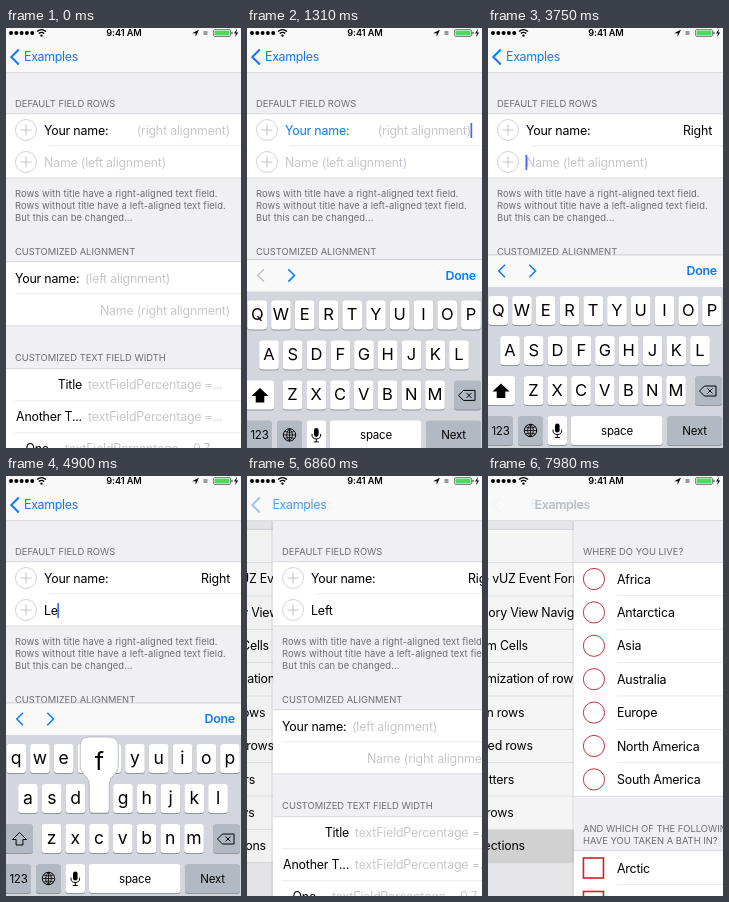
Write an HTML page that moves like this. It is 235x420 px and loops after 8 s.

```html
<!DOCTYPE html>
<html lang="en">
<head>
<meta charset="utf-8">
<title>Form rows</title>
<style>
  html, body { margin: 0; width: 100%; height: 100%; overflow: hidden; background: #efeff4; }
  svg { display: block; width: 100%; height: 100%; }
  text { font: 12.4px Inter, sans-serif; letter-spacing: -.2px; white-space: pre; }
  .head { font-size: 9.4px; letter-spacing: 0; fill: #6d6d72; }
  .note { font-size: 9.4px; letter-spacing: .08px; fill: #6d6d72; }
  .hint { fill: #c7c7cd; }
  .blue { fill: #0b7cf5; }
  .bold { font-weight: 600; }
  .end { text-anchor: end; }
  .mid { text-anchor: middle; }
  .upper { font-size: 16.5px; letter-spacing: 0; }
  .lower { font-size: 17.5px; letter-spacing: 0; }
  .small { font-size: 11.5px; }
  .line { fill: none; stroke: #000; }
  #backLabel, #title { letter-spacing: -.3px; }
</style>
</head>
<body>
<svg id="stage" viewBox="0 0 235 420"></svg>
<script>
const W = 235, LOOP = 8000, KEYBOARD = 193;
const EDGE = '#d0cfd4', SEPARATOR = '#dfdee3';

const text = (x, y, s, cls = '', id = '') => `<text x="${x}" y="${y}" class="${cls}" id="${id}">${s}</text>`;
const rect = (x, y, w, h, fill, more = '') => `<rect x="${x}" y="${y}" width="${w}" height="${h}" fill="${fill}" ${more}/>`;
const path = (d, more = '') => `<path d="${d}" class="line" ${more}/>`;
const circle = (x, y, r, more = '') => `<circle cx="${x}" cy="${y}" r="${r}" ${more}/>`;
const group = (id, ...parts) => `<g id="${id}">${parts.join('')}</g>`;

// White table section with hairlines between its rows
function section(y, pitch, rows, inset) {
  const h = pitch * rows;
  let s = rect(0, y, W, h, '#fff') + rect(0, y - .5, W, .7, EDGE) + rect(0, y + h - .5, W, .7, EDGE);
  for (let i = 1; i < rows; i++) s += rect(inset, y + i * pitch - .5, W, .7, SEPARATOR);
  return s;
}
const sheet = () => rect(-2, 45, 2, 375, '#000', 'opacity=".06"') + rect(0, 45, W, 375, '#efeff4');

function listPage() {
  const names = ['Rows', 'Native vUZ Event Form', 'Accesory View Navigation', 'Custom Cells',
    'Customization of rows with text…', 'Hidden rows', 'Disabled rows', 'Formatters', 'Inline rows', 'List Sections'];
  const top = 53.4, pitch = 33.35;
  return group('list', sheet(), section(top, pitch, names.length, 9),
    rect(0, 354, W, 33, '#d9d9d9', 'id="selected"'),
    ...names.map((name, i) => {
      const y = top + (i + .5) * pitch;
      return text(9.5, y + 4, name) + path(`M217,${y - 4.5}l4.5,4.5l-4.5,4.5`, 'stroke="#c7c7cc" style="stroke:#c7c7cc;stroke-width:1.5"');
    }));
}

function detailPage() {
  const plus = y => circle(20, y, 10.5, 'fill="none" stroke="#cfcfd3" stroke-width=".9"') +
    path(`M14.5,${y}h11M20,${y - 5.5}v11`, 'style="stroke:#c2c2c7"');
  const notes = ['Rows with title have a right-aligned text field.',
    'Rows without title have a left-aligned text field.', 'But this can be changed...'];
  return group('detail', sheet(),
    text(9, 79, 'DEFAULT FIELD ROWS', 'head'),
    section(86, 32, 2, 43), plus(102), plus(134),
    text(38, 106.5, 'Your name:', '', 'nameLabel'),
    text(224, 106.5, '', 'end', 'fieldA'), text(38, 138.5, '', '', 'fieldB'),
    rect(223, 95, 1.7, 15, '#426bf2', 'id="caret"'),
    ...notes.map((s, i) => text(9, 169 + i * 12, s, 'note')),
    text(9, 226.5, 'CUSTOMIZED ALIGNMENT', 'head'),
    section(234, 32, 2, 9),
    text(9, 254.5, 'Your name:'), text(79, 254.5, '(left alignment)', 'hint'),
    text(224, 286.5, 'Name (right alignment)', 'hint end'),
    text(9, 332.5, 'CUSTOMIZED TEXT FIELD WIDTH', 'head'),
    section(341, 32, 3, 9),
    text(76, 361, 'Title', 'end'), text(82, 361, 'textFieldPercentage =...', 'hint'),
    text(76, 393, 'Another T...', 'end'), text(82, 393, 'textFieldPercentage =...', 'hint'),
    text(53, 425, 'One...', 'end'), text(59, 425, 'textFieldPercentage = 0.7', 'hint'));
}

function choicePage() {
  const places = ['Africa', 'Antarctica', 'Asia', 'Australia', 'Europe', 'North America', 'South America'];
  const red = 'fill="none" stroke="#c8323e" stroke-width="1"';
  const box = y => rect(9.5, y, 20, 20, 'none', 'stroke="#d21f26" stroke-width="1.6"');
  return group('choice', sheet(),
    text(9, 79, 'WHERE DO YOU LIVE?', 'head'),
    section(86.5, 33.4, 7, 43),
    ...places.map((s, i) => {
      const y = 103 + i * 33.4;
      return circle(20, y, 10.6, red) + text(43, y + 4.5, s);
    }),
    text(9, 355.5, 'AND WHICH OF THE FOLLOWING OCEANS', 'head'),
    text(9, 368, 'HAVE YOU TAKEN A BATH IN?', 'head'),
    section(375, 33.4, 2, 43), box(382), box(415.5), text(43, 396.5, 'Arctic'));
}

function bars() {
  const dots = [0, 1, 2, 3, 4].map(i => circle(5 + i * 5.3, 5, 2)).join('');
  return rect(0, 0, W, 45, '#f9f9fa') + rect(0, 44.5, W, .6, '#c4c4c8') + dots +
    path('M31,3.6q4.5,-4 9,0M32.8,5.6q2.7,-2.4 5.4,0', 'stroke-width="1.3"') + circle(35.5, 7.6, 1.2) +
    text(118, 8.4, '9:41 AM', 'mid bold" style="font-size:9.2px;letter-spacing:-.1px') +
    '<path d="M186,5.2L193,1.8L189.6,8.8V5.2z"/>' + rect(197.5, 3, 4, 4, '#9a9a9e') +
    rect(207.5, 1.5, 17, 7, '#fff', 'rx="1.5" stroke="#555" stroke-width=".7"') +
    rect(208.5, 2.5, 15, 5, '#4cd964') + rect(225.3, 3.7, 1.2, 2.6, '#555') +
    '<path d="M231,1l-3,4.6h2l-1,3.6l3.2,-4.8h-2z"/>' +
    path('M12.8,21.5L5.3,29L12.8,36.5', 'id="back" style="stroke:#0b7cf5;stroke-width:2"') +
    text(18, 33.2, 'Examples', 'blue', 'backLabel') + text(22, 33.2, 'Examples', 'bold', 'title');
}

const ROWS = [['qwertyuiop', 10.2], ['asdfghjkl', 22], ['zxcvbnm', 45.5]];
const rowTop = r => 268 + r * 40;
function keyPosition(letter) {
  const r = ROWS.findIndex(([keys]) => keys.includes(letter.toLowerCase()));
  return [ROWS[r][1] + ROWS[r][0].indexOf(letter.toLowerCase()) * 23.75, rowTop(r)];
}

function keyboard() {
  const key = (x, y, w, fill = '#fff') => rect(x, y + 1, w, 29, '#8f9298', 'rx="3.2"') + rect(x, y, w, 29, fill, 'rx="3.2"');
  const gray = '#b3b9c3';
  const letters = [...ROWS.map(r => r[0]).join('')];
  const labels = (cls, change) => letters.map(c => {
    const [x, y] = keyPosition(c);
    return text(x, y + 20, change(c), 'mid ' + cls);
  });
  const chevron = (id, d) => path(d, `id="${id}" stroke-width="1.5"`);
  return group('keyboard', rect(0, 227, W, 32, '#f9f9fa'), rect(0, 226.6, W, .7, '#c0c0c4'),
    rect(0, 259, W, 161, '#d3d6dc'),
    chevron('prev', 'M17,236.8L10.8,243L17,249.2'), chevron('next', 'M41.3,236.8L47.5,243L41.3,249.2'),
    text(229, 247.3, 'Done', 'blue bold end', 'done'),
    ...letters.map(c => { const [x, y] = keyPosition(c); return key(x - 9.8, y, 19.6); }),
    group('upper', ...labels('upper', c => c.toUpperCase()), key(-2, 348, 29),
      '<path d="M13,355.5l8.5,8h-4.2v6.5h-8.6v-6.5h-4.2z"/>'),
    group('lower', ...labels('lower', c => c), key(-2, 348, 29, gray),
      path('M13.5,356.5l7,7h-3.6v5.5h-6.8v-5.5h-3.6z', 'stroke-width="1"')),
    key(207, 348, 27, gray),
    path('M211.5,363l5,-5h11.5v10h-11.5zM219.5,360.5l5,5m0,-5l-5,5', 'stroke-width="1"'),
    key(-2, 388, 27, gray), text(12.5, 407, '123', 'mid small'),
    key(30, 388, 25, gray), circle(42.5, 402.5, 6.2, 'class="line"'),
    path('M36.3,402.5h12.4M42.5,396.3v12.4M37.7,399q4.8,2 9.6,0M37.7,406q4.8,-2 9.6,0M42.5,396.3q-6,6.2 0,12.4q6,-6.2 0,-12.4', 'stroke-width=".8"'),
    key(59.5, 388, 19.5), rect(67, 395.5, 4.6, 9, '#000', 'rx="2.3"'),
    path('M65,401.5v1q0,4 4.3,4t4.3,-4v-1M69.3,406.5v3M66.8,409.5h5', 'stroke-width="1"'),
    key(83, 388, 91.5), text(129, 406.5, 'space', 'mid small'),
    key(179, 388, 55, gray), text(206.5, 406.5, 'Next', 'mid small'),
    '<g id="popup"><path fill="#fff" stroke="#a4a8af" stroke-width=".7" d="M-19,-38q0,-9 9,-9h20q9,0 9,9v20c0,9 -9,9 -9,19v24q0,4 -4,4h-12q-4,0 -4,-4v-24c0,-10 -9,-10 -9,-19z"/>' +
    text(0, -14, '', 'mid" style="font-size:25px', 'popupLetter') + '</g>');
}

const stage = document.getElementById('stage');
stage.innerHTML = listPage() + rect(0, 45, W, 375, '#000', 'id="dim"') + detailPage() + choicePage() + bars() + keyboard();
const el = {};
stage.querySelectorAll('[id]').forEach(n => { if (n.id) el[n.id] = n; });

// Each stroke: letter, key down, letter typed, key up
const STROKES_A = [['R', 1790, 1960, 1960], ['i', 2320, 2380, 2440], ['g', 2680, 2740, 2800],
  ['h', 2850, 2910, 2970], ['t', 3030, 3150, 3150]];
const STROKES_B = [['L', 4210, 4440, 4440], ['e', 4500, 4550, 4670], ['f', 4900, 4960, 5020], ['t', 5130, 5190, 5300]];

// Remaining distance of a critically damped spring
function spring(ms) {
  const a = Math.max(0, ms) * .01826;
  return (1 + a) * Math.exp(-a);
}
const move = (node, x, y = 0) => node.setAttribute('transform', `translate(${x} ${y})`);
const show = (node, on) => { node.style.display = on ? '' : 'none'; };

function setField(node, strokes, hint, t) {
  const typed = strokes.filter(s => t >= s[2]).map(s => s[0]).join('');
  node.textContent = typed || hint;
  node.classList.toggle('hint', !typed);
  return typed;
}

function render(t) {
  const focusA = t >= 1070 && t < 3750, focusB = t >= 3750 && t < 5750;
  setField(el.fieldA, STROKES_A, '(right alignment)', t);
  const typedB = setField(el.fieldB, STROKES_B, 'Name (left alignment)', t);
  el.nameLabel.classList.toggle('blue', focusA);
  show(el.caret, focusA || focusB);
  el.caret.setAttribute('x', focusA ? 223.5 : 37.5 + (typedB ? el.fieldB.getComputedTextLength() : 0));
  el.caret.setAttribute('y', focusA ? 95 : 127);

  const down = t < 1070 ? 1 : t < 5832 ? spring(t - 1000) : 1 - spring(t - 5832);
  move(el.keyboard, 0, KEYBOARD * down);
  show(el.keyboard, t >= 1070 && t < 6500);
  const upper = t < 1960 || (t >= 3750 && t < 4440);
  show(el.upper, upper);
  show(el.lower, !upper);
  el.prev.style.stroke = t < 3750 ? '#c3c5c9' : '#0b7cf5';
  el.next.style.stroke = '#0b7cf5';
  el.done.style.opacity = t < 5750 ? 1 : .25;

  const pressed = [...STROKES_A, ...STROKES_B].find(s => t >= s[1] && t < s[3]);
  show(el.popup, pressed);
  if (pressed) {
    move(el.popup, ...keyPosition(pressed[0]));
    el.popupLetter.textContent = pressed[0];
  }

  const popped = t < 6860 ? 0 : 1 - spring(t - 6830);
  const pushed = t < 7920 ? 0 : 1 - spring(t - 7863);
  const covered = t < 7600 ? 1 - popped : pushed;
  move(el.detail, W * popped);
  move(el.choice, W * (1 - pushed));
  show(el.detail, t < 7600);
  show(el.choice, t >= 7920);
  move(el.list, -.3 * W * covered);
  el.dim.style.opacity = .06 * covered;
  show(el.selected, t >= 7740);

  // The title and the back label slide together and cross-fade
  el.back.style.opacity = covered ** 8;
  el.backLabel.style.opacity = Math.max(0, (covered - .6) / .4);
  el.title.style.opacity = (1 - covered) ** 1.5;
  move(el.backLabel, 67 * (1 - covered));
  move(el.title, 67 * (1 - covered));
}

function tick() {
  render(performance.now() % LOOP);
  requestAnimationFrame(tick);
}
tick();
</script>
</body>
</html>
```
